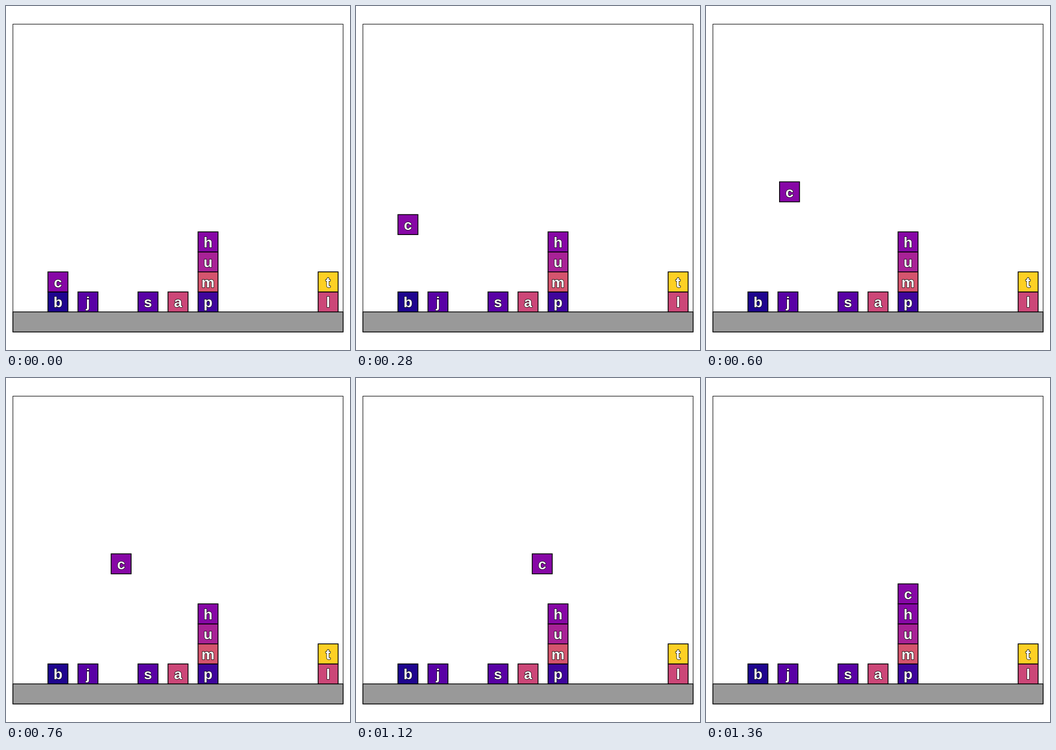
Recreate the animation shown at these times as an HTML page. Size 748 by 748 pixels, loop 1400 ms.

```html
<!DOCTYPE html>
<html lang="en">
<head>
<meta charset="utf-8">
<title>Blocks</title>
<style>
  html, body { margin: 0; width: 100%; height: 100%; overflow: hidden; background: #fff; }
  svg { display: block; width: 748px; height: 748px; }
  rect { stroke: #000; }
  text {
    font: bold 32px "Liberation Sans", Arial, sans-serif;
    text-anchor: middle;
    fill: #fff;
    stroke: #000;
    stroke-width: 1.8;
    stroke-linejoin: round;
    paint-order: stroke;
  }
</style>
</head>
<body>
<svg id="stage" viewBox="0 0 748 748">
  <rect x="15" y="39.5" width="718" height="669.2" fill="#fff" stroke-width="1.2"/>
  <rect x="15" y="665.2" width="718" height="43.5" fill="#999" stroke-width="1.7"/>
</svg>
<script>
const SIZE = 43.52, PITCH = SIZE * 1.5, LEFT = 15, GROUND = 665.2;
const STEP = 40, LOOP = 1400;
const stage = document.getElementById('stage');

function add(parent, tag, attrs) {
  const el = document.createElementNS('http://www.w3.org/2000/svg', tag);
  for (const key in attrs) el.setAttribute(key, attrs[key]);
  return parent.appendChild(el);
}

// Column and row may be fractional; row 0 rests on the ground.
function place(block, col, row) {
  const x = LEFT + (col + 0.5) * PITCH, y = GROUND - (row + 1) * SIZE;
  block.setAttribute('transform', `translate(${x} ${y})`);
}

function makeBlock(letter, color, col, row) {
  const block = add(stage, 'g', {});
  add(block, 'rect', { x: -SIZE / 2, width: SIZE, height: SIZE, fill: color, 'stroke-width': 1.8 });
  add(block, 'text', { y: 33.5 }).textContent = letter;
  place(block, col, row);
  return block;
}

[
  ['b', '#1f058f', 1, 0], ['j', '#5901a5', 2, 0],
  ['s', '#5901a5', 4, 0], ['a', '#cc4778', 5, 0],
  ['p', '#3f049c', 6, 0], ['m', '#d5546e', 6, 1],
  ['u', '#a82296', 6, 2], ['h', '#8707a6', 6, 3],
  ['l', '#cc4778', 10, 0], ['t', '#fdd024', 10, 1],
].forEach(args => makeBlock(...args));
const mover = makeBlock('c', '#8707a6', 1, 1);

const progress = (step, from, to) => Math.min(1, Math.max(0, (step - from) / (to - from)));

// Lift, carry across, then lower onto the stack.
function draw(now) {
  const step = Math.floor((now % LOOP) / STEP);
  const col = 1 + 5 * progress(step, 11, 30);
  const row = 1 + 4.5 * progress(step, 0, 11) - 1.5 * progress(step, 30, 34);
  place(mover, col, row);
  requestAnimationFrame(draw);
}
draw(0);
</script>
</body>
</html>
```
